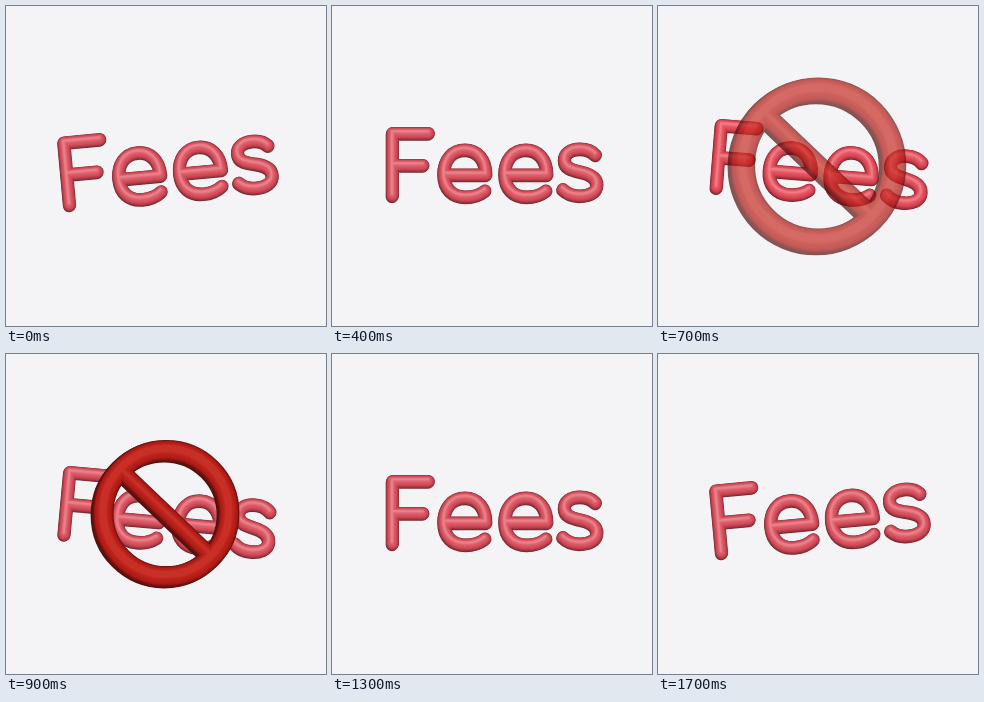
An HTML page that plays this animation: 320 by 320 pixels, repeating every 1800 ms.

```html
<!DOCTYPE html>
<html lang="en">
<head>
<meta charset="utf-8">
<title>No fees</title>
<style>
  html, body { margin: 0; height: 100%; overflow: hidden; background: #f4f3f5; }
  svg { display: block; width: 100vw; height: 100vh; }
  path, circle, line { vector-effect: none; }
</style>
</head>
<body>
<svg viewBox="0 0 320 320" fill="none" stroke-linecap="round" stroke-linejoin="round" role="img" aria-label="Fees">
  <defs>
    <path id="e" d="M113 169H154C154 153 145 144 133 144C120 144 112 154 112 168C112 183 121 191 134 191C142 191 148 189 153 185"/>
    <g id="letters">
      <path d="M60.5 190V127.5H96.5M60.5 159.5H91"/>
      <use href="#e"/>
      <use href="#e" x="61"/>
      <path d="M263.5 149C260 145 254 143 248 143C238 143 232.5 148 232.5 154C232.5 162 240 164 249 166C258 168 265 171 265 179C265 186 258 190 248 190C240 190 235 187.5 231 183.5"/>
    </g>
  </defs>
  <g id="word"></g>
  <g id="sign"></g>
</svg>
<script>
const LOOP = 1800, STEP = 100;
const word = document.getElementById('word');
const sign = document.getElementById('sign');

const mix = (a, b, k) => a.map((v, i) => v + (b[i] - v) * k);
const rgb = c => `rgb(${c.map(Math.round)})`;
const ramp = (stops, k) => {
  const x = k * (stops.length - 1), i = Math.min(Math.floor(x), stops.length - 2);
  return rgb(mix(stops[i], stops[i + 1], x - i));
};

// Narrowing strokes, each a little closer to the light, give a round tube.
function buildWord() {
  const shades = [[142, 50, 60], [196, 68, 80], [214, 81, 93], [221, 94, 105], [232, 128, 137]];
  const layer = (x, y, width, color) =>
    `<use href="#letters" x="${x}" y="${y}" stroke-width="${width}" stroke="${color}"/>`;
  let out = layer(-0.5, 0.9, 12.6, '#6d2b32');
  for (let i = 0; i <= 11; i++) {
    const k = i / 11;
    out += layer(-0.6 * k, -2.3 * k, 13 - 11.2 * k, ramp(shades, k));
  }
  word.innerHTML = out;
}

function buildSign() {
  const shades = [[112, 17, 14], [168, 27, 22], [184, 30, 24], [188, 34, 27], [200, 48, 39]];
  const layer = (x, y, trim, color) =>
    `<g transform="translate(${x} ${y})" stroke="${color}">
      <line x1="-43" y1="-41" x2="43" y2="41" stroke-width="${17 - trim}"/>
      <circle r="63" stroke-width="${21 - trim}"/>
    </g>`;
  let out = layer(-1.6, 1.2, 0, '#4b0f0d') + layer(-0.8, 0.6, 0, '#5c120f');
  for (let i = 0; i <= 9; i++) {
    const k = i / 9;
    out += layer(0.5 - 0.3 * k, -0.3 - 2 * k, 0.4 + 14 * k, ramp(shades, k));
  }
  sign.innerHTML = out;
}

// time, sign scale, sign opacity, warmth of the word
const keys = [
  [500, 1.8, 0, 0],
  [600, 1.61, 0.17, 1],
  [700, 1.2, 0.7, 0.4],
  [800, 1, 1, 0],
  [900, 1, 1, 0],
  [1000, 1.4, 0.5, 0.2],
  [1100, 2.18, 0.055, 0.3],
  [1200, 2.5, 0, 0]
];

function poseAt(t) {
  const i = keys.findIndex(key => key[0] > t);
  if (i < 1) return keys[0];
  const [a, b] = [keys[i - 1], keys[i]];
  return mix(a, b, (t - a[0]) / (b[0] - a[0]));
}

function draw(now) {
  const t = Math.floor(now % LOOP / STEP) * STEP;
  const angle = -5.3 * Math.cos((t + STEP / 2) / LOOP * 2 * Math.PI);
  const [, scale, opacity, warmth] = poseAt(t);
  word.setAttribute('transform', `rotate(${angle} 162 160)`);
  word.style.filter = warmth ? `saturate(${1 + 0.35 * warmth}) brightness(${1 - 0.06 * warmth})` : 'none';
  sign.setAttribute('transform', `translate(159.7 159.7) scale(${scale})`);
  sign.setAttribute('opacity', opacity);
}

buildWord();
buildSign();
const start = performance.now();
function tick() {
  draw(performance.now() - start);
  requestAnimationFrame(tick);
}
tick();
</script>
</body>
</html>
```
